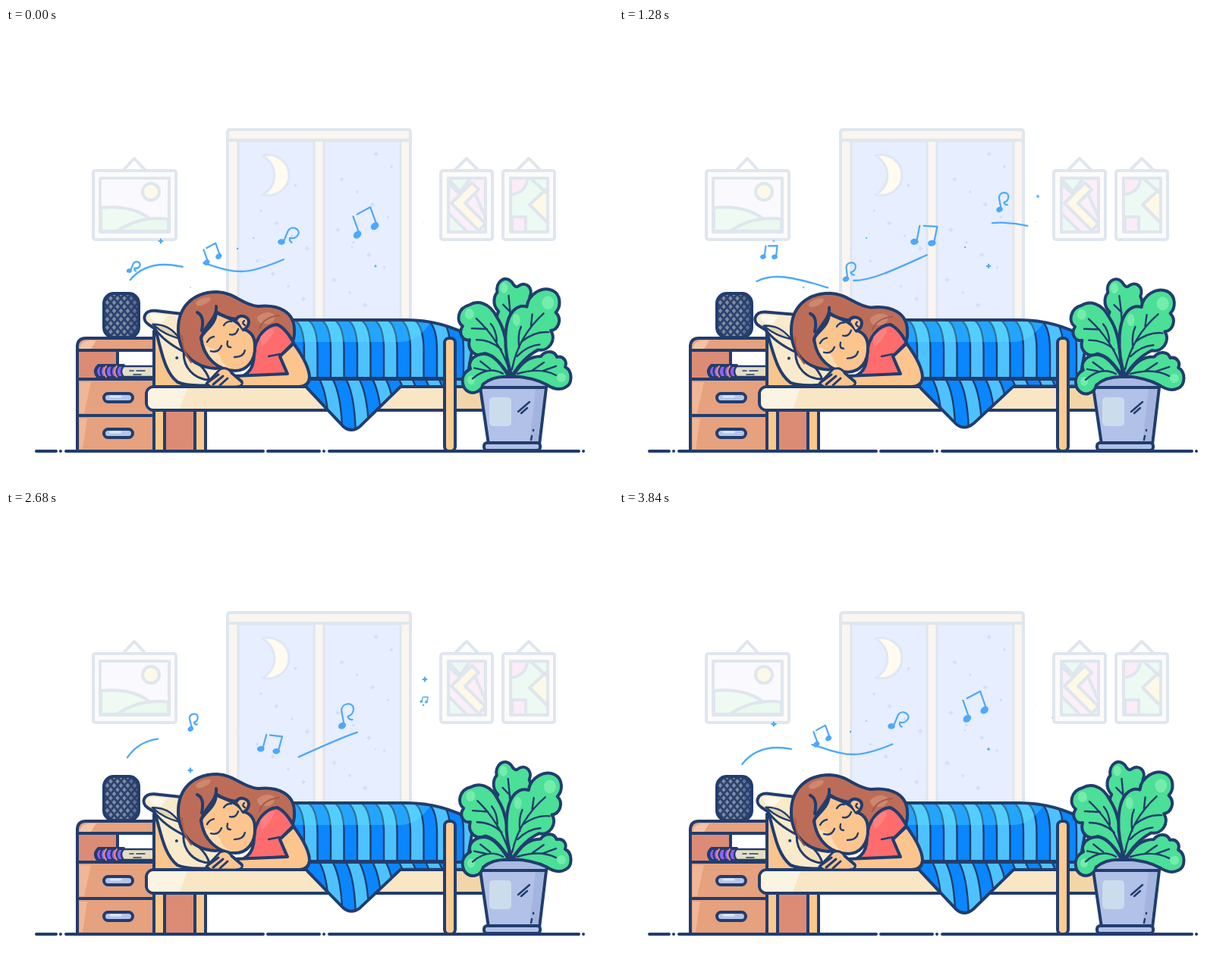
Write an HTML page that moves like this. It is 800 px wide and 600 px high and loops after 3.88 s.

```html
<!DOCTYPE html>
<html lang="en">
<head>
<meta charset="utf-8">
<title>Sleeping to music</title>
<style>
html, body { margin: 0; width: 100%; height: 100%; overflow: hidden; background: #fff; }
svg { display: block; width: 800px; height: 600px; }
.ink { stroke: #213d6e; stroke-width: 4; stroke-linecap: round; stroke-linejoin: round; }
.thin { stroke-width: 2.4; }
.line { fill: none; }
.faint { stroke: #dfe6ee; stroke-width: 4; stroke-linejoin: round; stroke-linecap: round; fill: #fcfbfa; }
.music { stroke: #4da8ff; stroke-width: 2.3; stroke-linecap: round; stroke-linejoin: round; fill: none; }
.music use, .music path { vector-effect: non-scaling-stroke; }
.skin { fill: #fdc58e; }
.leaf { fill: #4bdf98; }
.shine { fill: #84f0b2; stroke: none; opacity: .75; }
</style>
</head>
<body>
<svg viewBox="0 0 800 600">
<defs>
  <pattern id="mesh" width="9" height="11" patternUnits="userSpaceOnUse" x="129" y="351">
    <rect width="9" height="11" fill="#7f8ba5"/>
    <path d="M-1-1.2L10 12.2M10-1.2L-1 12.2" stroke="#2b426e" stroke-width="2.7"/>
  </pattern>
  <clipPath id="bodyClip"><path d="M372 385H528Q575 385 617 409L606 472H396Z"/></clipPath>
  <clipPath id="drapeClip"><path id="drapeShape" d="M388 463H605V473H520L467 525Q455 535 444 525L398 476Z"/></clipPath>
  <path id="guide" d="M160 337Q182 305 228 314C270 322 285 333 310 333C350 333 420 286 482 270Q530 264 575 286"/>
  <g id="single">
    <path d="M-3 14L-5-7C-4-18 12-18 12-9C12-3 8 1 3 2Q4 7 9 7"/>
    <ellipse cx="-6" cy="14" rx="4.5" ry="3.2" transform="rotate(-25 -6 14)" fill="#4da8ff"/>
  </g>
  <g id="double">
    <path d="M-11 14V-11M-5-12L15-15V11"/>
    <ellipse cx="-14" cy="14" rx="4.8" ry="3.4" transform="rotate(-20 -14 14)" fill="#4da8ff"/>
    <ellipse cx="12" cy="11" rx="4.8" ry="3.4" transform="rotate(-20 12 11)" fill="#4da8ff"/>
  </g>
</defs>

<!-- window -->
<g class="faint">
  <rect x="292" y="134" width="241" height="260" rx="3" fill="#faf5f1"/>
  <path d="M306 149H406V394H306ZM419 149H520V394H419Z" fill="#e6eeff" stroke-width="3"/>
  <path d="M293 148H532"/>
  <path d="M338 168C356 164 373 176 373 194S356 224 338 220C359 209 359 181 338 168Z" fill="#fffbef" stroke="#dfe7f4" stroke-width="3"/>
</g>
<g id="stars" fill="none" stroke="#d2ddff" stroke-width="2" stroke-linecap="round"></g>

<!-- pictures -->
<g class="faint">
  <path d="M155 187L169 172L183 187" fill="none"/>
  <rect x="115" y="188" width="109" height="91" rx="3"/>
  <rect x="124" y="198" width="91" height="71" fill="#faf9fd"/>
  <path d="M125 237Q165 233 189 251L150 268H125Z" fill="#eefaf2"/>
  <path d="M146 268Q177 247 214 252V268Z" fill="#e9f9ef"/>
  <circle cx="191" cy="216" r="11" fill="#fdf9e8"/>
  <path d="M592 187L607 172L622 187M674 187L689 172L704 187" fill="none"/>
  <rect x="573" y="188" width="68" height="91" rx="3"/>
  <rect x="655" y="188" width="68" height="91" rx="3"/>
</g>
<g class="faint" stroke-width="3">
  <rect x="583" y="198" width="49" height="71" fill="#fbeff9"/>
  <path d="M583 198H612L597 218L583 205ZM583 244L608 269H583Z" fill="#ecf9f2"/>
  <path d="M614 204L587 231L623 267L632 258L605 231L623 213Z" fill="#fdf9e6"/>
  <path d="M600 218L586 202M618 218L632 250" fill="none"/>
  <rect x="665" y="198" width="49" height="71" fill="#edf9f3"/>
  <path d="M665 198H687Q686 217 665 220ZM667 249H685V269H667Z" fill="#fbecf8"/>
  <path d="M714 211L690 233L714 257Z" fill="#fdf9e6"/>
  <path d="M691 198L714 219M690 233L714 257" fill="none"/>
</g>

<!-- nightstand -->
<g class="ink">
  <path d="M94 558V424H250V558Z" fill="#e6a17e"/>
  <path d="M96 427H146V462H96ZM210 500H249V557H210Z" fill="#dc8b75" stroke="none"/>
  <path d="M148 427H195V445H148Z" fill="#fff" stroke="none"/>
  <path d="M94 425V419Q95 409 105 409H196V425Z" fill="#e6a17e"/>
  <path d="M98 419Q101 412 111 412H119L112 423H97Z" fill="#f2c4a8" stroke="none"/>
  <path d="M97 467H112L103 508H97ZM97 515H107L101 555H97Z" fill="#efb797" stroke="none"/>
  <path d="M94 463H196M94 511H196M147 427V444" class="line"/>
  <rect x="129" y="482" width="38" height="11" rx="5.5" fill="#b5c4e9"/>
  <rect x="129" y="529" width="38" height="11" rx="5.5" fill="#b5c4e9"/>
  <path d="M138 486H151M138 533H151" class="line" style="stroke:#dce7f5;stroke-width:3"/>
  <path d="M122 445H155V461H122Q114 453 122 445Z" fill="#8d62f5"/>
  <path d="M128 445Q121 453 128 461M135 445Q128 453 135 461M142 445Q135 453 142 461M149 445Q142 453 149 461" class="line thin"/>
  <path d="M132 446Q126 453 132 460M146 446Q140 453 146 460" class="line" style="stroke:#ef8a72;stroke-width:2"/>
  <path d="M196 446H155Q149 453 155 460H196Z" fill="#e5dec2" stroke-width="2.4"/>
  <path d="M163 452H168M172 452H183M168 457H178" class="line" stroke-width="1.5"/>
  <rect x="129" y="350" width="46" height="58" rx="13" fill="url(#mesh)"/>
  <path d="M160 352Q174 353 173 366V394Q173 406 161 406Q168 380 160 352Z" fill="#213d6e" opacity=".35" stroke="none"/>
</g>

<!-- bed -->
<g class="ink">
  <path d="M195 400H209V558H195ZM249 490H263V558H249Z" fill="#fac88d"/>
  <path d="M195 490V400H212L236 473H195Z" fill="#f8c58c"/>
</g>
<g id="pillow" class="ink">
  <path d="M240 378L196 373C181 372 178 385 187 391L196 397C204 420 207 452 226 467Q238 473 275 471L300 430Z" fill="#f9eacc"/>
  <path d="M190 377L213 379L205 389Q188 389 190 377Z" fill="#fdf8ea" stroke="none"/>
  <path d="M193 391C205 402 215 406 229 410C218 396 209 391 193 391Z" fill="#e6d5b2" class="thin"/>
  <path d="M196 397Q208 414 234 427C233 447 247 463 268 464Q263 446 235 428" fill="#f5dfb7" stroke-width="3"/>
  <path d="M225 435h0" class="line"/>
</g>
<rect class="ink" x="185" y="473" width="455" height="31" rx="10" fill="#f9e6c5"/>
<path d="M187 483Q187 475 195 475H239L229 502H195Q187 502 187 494Z" fill="#fbf4e2"/>
<path d="M593 475H626V502H593Z" fill="#f3d6a8"/>
<g clip-path="url(#bodyClip)">
  <rect x="370" y="380" width="250" height="95" fill="#0a86ff"/>
  <g id="bodyStripes" class="ink thin"></g>
  <path d="M370 380H565Q545 414 520 414H370Z" fill="#5eeaff" opacity=".3"/>
</g>
<path class="ink line" d="M378 385H528Q575 385 617 409L606 472M394 462H580"/>
<g id="drape">
  <g clip-path="url(#drapeClip)">
    <rect x="380" y="460" width="230" height="75" fill="#0a86ff"/>
    <g id="drapeStripes" class="ink thin"></g>
  </g>
  <use href="#drapeShape" class="ink line"/>
</g>
<rect class="ink" x="578" y="409" width="14" height="149" rx="6" fill="#fdcb90"/>

<!-- sleeper -->
<g class="ink">
  <g class="breath">
    <path d="M276 448C245 446 227 425 227 396C227 365 248 347 278 347C302 348 311 364 332 366C359 363 380 373 380 397Q381 410 374 419L326 440Z" fill="#bd6d57"/>
    <path d="M250 361Q258 353 269 354Q272 359 260 364Q250 368 250 361ZM331 380Q344 369 355 378Q353 391 340 389Q331 389 331 380Z" fill="#cd876f" stroke="none"/>
    <path d="M334 395Q340 380 360 378M244 440Q232 425 232 405" class="line" style="stroke:#a75a49;stroke-width:2"/>
  </g>
  <path d="M318 455Q327 447 327 430C328 407 343 392 357 391Q368 395 379 415L361 433L371 456L311 460Z" fill="#ff6c6d"/>
  <path d="M335 408Q344 396 354 396Q350 411 337 420Z" fill="#ff8080" stroke="none"/>
  <path d="M379 416C390 431 400 449 400 461Q399 473 386 473H276L300 459L371 456L361 433Z" class="skin"/>
  <path d="M346 433L361 430" class="line thin"/>
  <g class="breath">
    <path d="M257 407C263 396 276 391 277 374C288 381 305 383 312 396Q328 400 328 418C329 438 317 451 302 451C281 451 260 435 257 407Z" class="skin"/>
    <path d="M262 418Q280 422 284 438Q290 447 300 448Q271 446 262 418Z" fill="#fddcb2" stroke="none"/>
    <path d="M304 382C309 376 320 379 320 387Q319 394 313 397" class="skin"/>
    <path d="M277 366C279 382 260 392 257 409M252 374Q262 378 258 398M277 373Q289 381 304 383" class="line"/>
    <path d="M265 413Q268 407 274 406M287 391Q291 385 297 386M270 425Q280 428 284 418M295 403Q303 405 306 396M292 412Q290 420 296 420M301 433Q313 433 315 424M314 385Q310 388 315 391" class="line thin"/>
  </g>
  <path d="M264 469L282 450Q291 446 297 454L311 466Q313 473 302 473H270Z" class="skin" stroke-width="3"/>
  <path d="M265 468L280 457M273 470L286 459M282 471L292 462M297 455L311 467" class="line" stroke-width="3"/>
</g>

<!-- floor and plant -->
<path class="ink line" d="M40 558H66M72 558h0M79 558H339M345 558H413M419 558h0M426 558H755M761 558h0"/>
<g class="ink">
  <path d="M625 474H712L703 549H636Z" fill="#b2c1e7"/>
  <path d="M698 476H709L701 547H690Z" fill="#a3b4df" stroke="none"/>
  <rect x="637" y="487" width="29" height="38" rx="5" fill="#cbdcec" stroke="none"/>
  <path d="M675 506L690 493M679 508L687 501M695 530v1M693 538L692 543" class="line thin"/>
  <rect x="630" y="547" width="74" height="10" rx="4" fill="#b2c1e7"/>
  <rect x="624" y="460" width="90" height="14" rx="5" fill="#a9b9e2"/>
</g>
<g class="ink">
  <g class="sway" data-peak="3440">
    <path class="leaf" d="M668 457C652 425 640 390 648 374C638 364 643 352 646 349C643 335 656 325 665 335Q670 344 674 340C684 333 694 343 689 354C694 366 690 378 684 388L670 457Z"/>
    <ellipse class="shine" cx="655" cy="343" rx="5" ry="7"/>
    <path class="line thin" d="M664 430Q666 390 661 353M665 390L676 370M664 375L654 365"/>
  </g>
  <g class="sway" data-peak="2840">
    <path class="leaf" d="M664 459C660 425 661 402 647 381C637 361 621 359 611 365C595 369 593 387 602 393C595 403 603 413 611 411C607 426 620 435 631 429C644 432 651 441 664 459Z"/>
    <ellipse class="shine" cx="611" cy="377" rx="6" ry="7"/>
    <path class="line thin" d="M663 450Q650 411 620 383M647 413Q646 398 639 390M653 424Q639 411 620 411M634 397L614 396"/>
  </g>
  <g class="sway" data-peak="2000">
    <path class="leaf" d="M667 459C655 425 657 385 671 372Q679 365 688 368C690 351 709 341 722 347C734 353 733 369 726 376C735 385 729 399 719 400C727 412 716 428 702 425C690 431 678 441 667 459Z"/>
    <ellipse class="shine" cx="716" cy="363" rx="8" ry="9"/>
    <ellipse class="shine" cx="674" cy="385" rx="5" ry="8"/>
    <path class="line thin" d="M667 450Q676 407 710 377M677 422Q675 404 680 394M680 414Q698 400 716 402M674 433Q688 419 704 418M693 393L695 378"/>
  </g>
  <g class="sway" data-peak="1000">
    <path class="leaf" d="M668 459C680 440 690 433 705 433C711 425 723 425 726 434C735 432 740 440 737 447C747 452 747 470 737 474C728 479 718 474 712 470Q695 461 668 459Z"/>
    <ellipse class="shine" cx="732" cy="461" rx="6" ry="6"/>
    <path class="line thin" d="M674 456Q704 447 725 458M693 452L709 441M708 452L725 446"/>
  </g>
  <g class="sway" data-peak="3340">
    <path class="leaf" d="M663 460C650 439 637 425 621 432C612 436 609 444 612 450C601 456 600 466 604 475C612 486 626 482 629 470Q642 459 663 460Z"/>
    <ellipse class="shine" cx="613" cy="465" rx="5" ry="6"/>
    <path class="line thin" d="M655 456Q635 445 615 463M638 450L625 440M632 452L617 449"/>
  </g>
</g>
<g id="music" class="music"></g>
</svg>

<script>
const LOOP = 3880, STEP = 40, TURN = 2 * Math.PI;
const $ = id => document.getElementById(id);
const all = name => [...document.getElementsByClassName(name)];
const fract = v => v - Math.floor(v);
const wave = (t, peak) => Math.cos((t - peak) / LOOP * TURN);

function add(parent, tag, attrs) {
  const el = document.createElementNS('http://www.w3.org/2000/svg', tag);
  for (const k in attrs) el.setAttribute(k, attrs[k]);
  return parent.appendChild(el);
}

function drawStars() {
  for (let i = 0; i < 26; i++) {
    const x = (i % 2 ? 426 : 312) + 86 * fract(i * .618 + .1), y = 158 + i * 8.3;
    const d = i % 4 < 2 ? `M${x - 2} ${y}h4M${x} ${y - 2}v4` : `M${x - .8} ${y}a.8.8 0 1 0 1.6 0a.8.8 0 1 0-1.6 0`;
    if (x > 380 || y > 225) add($('stars'), 'path', { d });
  }
}

function drawStripes() {
  const fill = '#4dc2ff';
  for (let x = 393; x < 610; x += 35) {
    add($('bodyStripes'), 'path', {
      fill, d: `M${x - 15} 384Q${x} 390 ${x} 425V475h17.5V425q0-35-15-41Z`
    });
    add($('drapeStripes'), 'path', {
      fill, d: `M${x + 18} 460q14 20 15 80h17.5q-1-60-15-80Z`
    });
  }
}

// Four evenly spaced tracks follow one guide, each at its own height.
const guide = $('guide'), guideLength = guide.getTotalLength();
const tracks = [16, 10, -12, 0].map((lift, k) => ({
  lift, delay: k / 4, double: k % 2,
  note: add($('music'), 'use', { href: k % 2 ? '#double' : '#single' }),
  strand: k !== 1 && add($('music'), 'path', {
    d: guide.getAttribute('d'), pathLength: 1, transform: `translate(0 ${lift})`
  })
}));

// x, y and the part of the loop at which each twinkle is largest
const pluses = [[204, 281, .47], [243, 342, .18], [487, 314, .38], [552, 222, .22]];
const dots = [[305, 291, .5], [326, 277, .4], [456, 289, .36], [550, 256, .18]];
const twinkles = [...pluses, ...dots].map(([x, y, peak], i) => ({
  x, y, peak,
  el: add($('music'), 'path', { d: i < 4 ? 'M-2.5 0h5M0-2.5v5' : 'M0 0h.2' })
}));

function moveNote({ note, lift, delay, double }, t) {
  const s = fract(t / LOOP - delay);
  const { x, y } = guide.getPointAtLength(guideLength * (.03 + .97 * s));
  const size = Math.max(.01, Math.min(.53 + .6 * s, 4.3 * (1 - s)));
  const tilt = (double ? 0 : 8) - 20 * Math.cos((s - .24) / .52 * TURN);
  note.setAttribute('transform', `translate(${x} ${y + lift - 28}) rotate(${tilt}) scale(${size})`);
  note.style.strokeWidth = 2.2 / Math.max(size, .4);
}

function moveStrand({ strand, delay }, t) {
  const u = fract((t - 400) / LOOP - delay) * 1.14;
  const head = 1.1 * u, length = .25 * Math.sin(Math.PI * Math.min(u, 1) ** .8);
  const tail = Math.max(0, head - length);
  strand.setAttribute('visibility', u < 1 && tail < 1 ? 'visible' : 'hidden');
  strand.setAttribute('stroke-dasharray', `${Math.min(head, 1) - tail} 3`);
  strand.setAttribute('stroke-dashoffset', -tail);
}

function render(t) {
  for (const track of tracks) {
    moveNote(track, t);
    if (track.strand) moveStrand(track, t);
  }
  for (const { x, y, peak, el } of twinkles) {
    const size = .5 + .5 * wave(2 * t, 2 * peak * LOOP);
    el.style.strokeWidth = 2.3 * size;
    el.setAttribute('transform', `translate(${x} ${y}) scale(${size})`);
  }
  for (const el of all('breath')) el.setAttribute('transform', `translate(0 ${1.3 + 1.4 * wave(t, 1080)})`);
  $('pillow').setAttribute('transform', `rotate(${-.6 + 1.2 * wave(t, 3450)} 245 471)`);
  $('drape').setAttribute('transform', `translate(0 463) scale(1 ${.97 + .03 * wave(t, 3700)}) translate(0 -463)`);
  for (const el of all('sway')) el.setAttribute('transform', `rotate(${wave(t, +el.dataset.peak)} 667 459)`);
}

function tick() {
  render(Math.floor(performance.now() % LOOP / STEP) * STEP);
  requestAnimationFrame(tick);
}

drawStars();
drawStripes();
tick();
</script>
</body>
</html>
```
